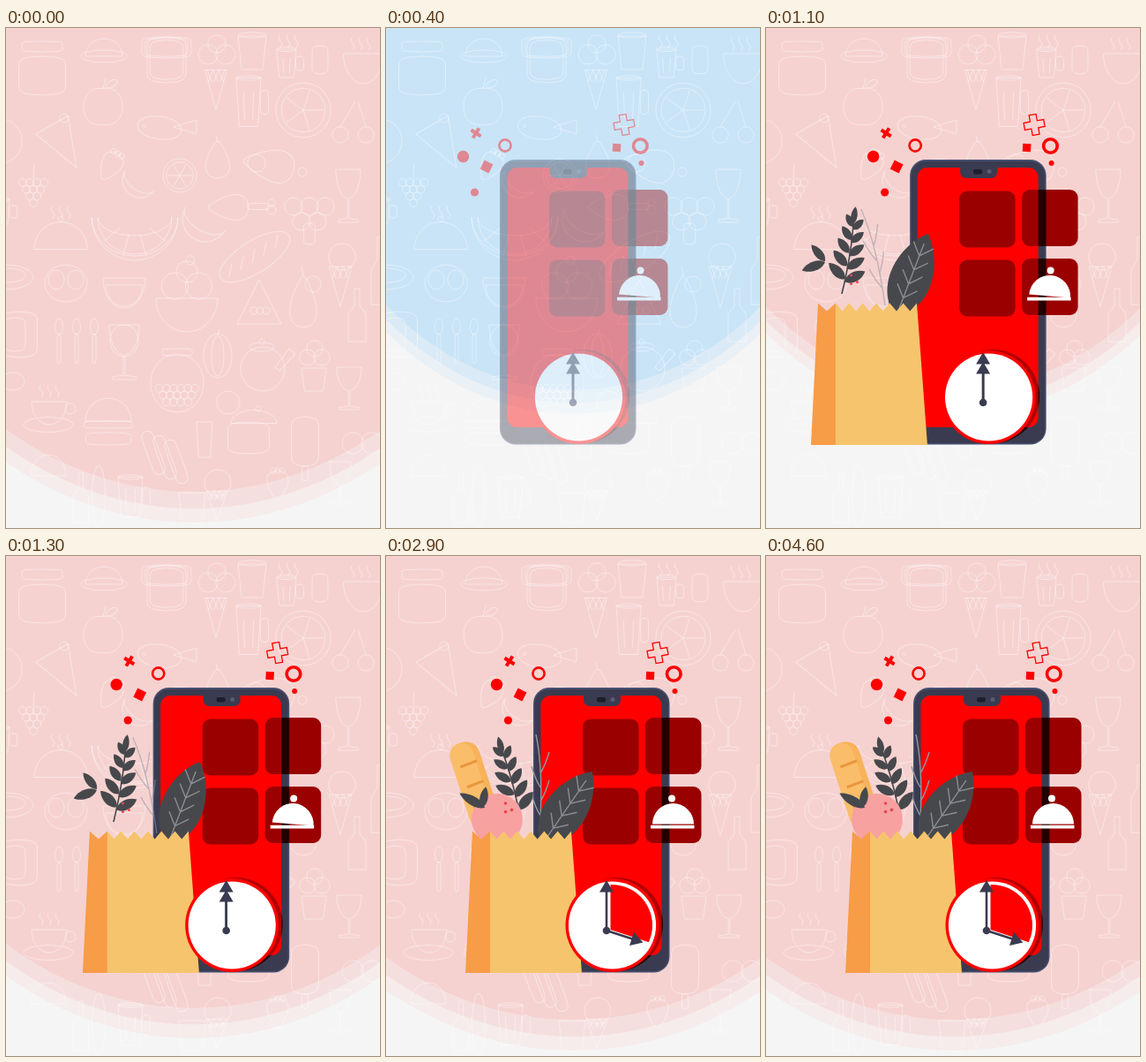
These frames come from a looping animation (424x566 px, 4.7 s). An HTML page with a canvas:

```html
<!DOCTYPE html>
<html lang="en">
<head>
<meta charset="utf-8">
<title>Food order</title>
<style>
html, body { margin: 0; width: 100%; height: 100%; overflow: hidden; background: #f5f5f5; }
canvas { display: block; }
</style>
</head>
<body>
<canvas id="stage" width="424" height="566"></canvas>
<script>
const W = 424, H = 566, LOOP = 4700, STEP = 100, TAU = Math.PI * 2;
const RED = '#ff0000', INK = '#3a3b50', LEAF = '#47484c';
const ctx = document.getElementById('stage').getContext('2d');

function layer() {
  const c = document.createElement('canvas');
  c.width = W; c.height = H;
  return c.getContext('2d');
}
const paper = layer(), s = layer();

const clamp = v => Math.min(1, Math.max(0, v));
const span = (t, a, b) => clamp((t - a) / (b - a));
const mix = (a, b, k) => a + (b - a) * k;
const cubicOut = k => 1 - (1 - k) ** 3;
const smooth = k => k * k * (3 - 2 * k);
const rad = d => d * Math.PI / 180;

function at(g, x, y, deg, draw) {
  g.save();
  g.translate(x, y);
  g.rotate(rad(deg));
  draw();
  g.restore();
}

// ---------- line-art wallpaper ----------
// Half-width of each outline from top (u = 0) to bottom (u = 1).
const ball = u => 2 * Math.sqrt(Math.max(0, u - u * u));
const dome = u => Math.sqrt(u * (2 - u));
const bowl = u => Math.sqrt(1 - u * u);
const slab = u => Math.sqrt(1 - (2 * u - 1) ** 8);
const cup = u => 1 - u / 4;
const cone = u => 1 - u;
const pear = u => ball(u) * (.35 + .75 * u);
const bottle = u => .3 + .7 * smooth(span(u, .3, .5));
const goblet = u => u < .55 ? bowl(u / .55) : u < .93 ? .06 : .8;

function drawWallpaper(g) {
  const put = (shape, w, h, x, y, deg = 0) => at(g, x, y, deg, () => {
    g.beginPath();
    for (const side of [1, -1]) {
      for (let i = 0; i <= 40; i++) {
        const u = side > 0 ? i / 40 : 1 - i / 40;
        g.lineTo(side * w / 2 * shape(u), (u - .5) * h);
      }
    }
    g.closePath();
    g.stroke();
  });
  const spot = (x, y, r) => put(ball, r * 2, r * 2, x, y);
  const cut = (x, y, dx, dy) => {
    g.beginPath();
    g.moveTo(x, y);
    g.lineTo(x + dx, y + dy);
    g.stroke();
  };
  const steam = (x, y) => {
    for (let i = -1; i <= 1; i++) {
      g.beginPath();
      for (let j = 0; j < 15; j++) g.lineTo(x + i * 9 + 2 * Math.sin(j / 2.4), y - j);
      g.stroke();
    }
  };
  // Rows of circles, each row one shorter than the row above.
  const cluster = (x, y, r, top, rows) => {
    for (let j = 0; j < rows; j++)
      for (let i = 0; i < top - j; i++) spot(x + (i - (top - j - 1) / 2) * r * 1.8, y + j * r * 1.7, r);
  };
  const wheel = (x, y, r, n) => {
    spot(x, y, r);
    spot(x, y, r * .8);
    for (let i = 0; i < n; i++) cut(x, y, r * .75 * Math.cos(i * TAU / n), r * .75 * Math.sin(i * TAU / n));
  };
  const crescent = (x, y, r, fat, deg) => at(g, x, y, deg, () => {
    g.beginPath();
    g.arc(0, 0, r, 0, Math.PI);
    g.ellipse(0, 0, r, r * (1 - fat), 0, Math.PI, 0, true);
    g.stroke();
  });
  const mug = (w, h, x, y) => {
    put(cup, w, h, x, y);
    put(ball, w, 5, x, y - h / 2);
    put(slab, 9, h * .5, x + w / 2 + 4, y);
    for (const side of [-1, 1]) cut(x + side * w * .2, y - h * .2, -side, h * .55);
  };
  const waffle = (x, y, w, h) => {
    put(cone, w, h, x, y);
    for (const side of [-1, 1])
      for (let i = 0; i < 3; i++) cut(x + side * w * (.5 - i / 3) * .8, y - h / 2, -side * w * .22, h * .3);
  };
  const cherry = (x, y) => { spot(x, y, 9); cut(x, y - 9, (398 - x) * .9, -29); };
  const berry = (x, y) => { put(u => pear(1 - u), 30, 34, x, y); cluster(x, y - 17, 3, 3, 1); };
  const cutlery = (x, y) => { put(slab, 4, 34, x, y + 9); put(ball, 9, 18, x, y - 16); };

  g.strokeStyle = 'rgba(255,255,255,.42)';
  g.lineWidth = 1;
  g.lineJoin = 'round';

  // jars
  put(slab, 53, 44, 41, 54); put(slab, 46, 12, 41, 21);
  put(ball, 60, 66, 194, 402); put(slab, 34, 8, 194, 367); cluster(194, 408, 4.5, 6, 3);

  // domes and bowls
  put(dome, 42, 20, 111, 22); put(ball, 52, 14, 111, 32);
  put(dome, 60, 31, 62, 235); spot(62, 216, 3); steam(62, 216);
  put(bowl, 45, 34, 405, 46); steam(402, 25);
  put(bowl, 48, 34, 134, 300); put(bowl, 42, 24, 134, 303);
  put(bowl, 70, 38, 205, 325); cluster(205, 292, 15, 2, 1); cluster(205, 276, 12, 1, 1); spot(209, 263, 5);
  put(bowl, 40, 26, 49, 436); put(ball, 56, 17, 48, 449); spot(73, 431, 6); steam(49, 418);
  put(slab, 47, 36, 275, 464); put(dome, 52, 15, 281, 440); spot(286, 431, 3); spot(252, 424, 13);
  put(dome, 52, 26, 116, 432); put(slab, 55, 8, 116, 449); put(slab, 51, 14, 116, 465);
  put(ball, 64, 28, -1, 282); put(ball, 40, 16, 2, 280);

  // glasses and bottles
  put(cup, 32, 38, 279, 28); put(ball, 32, 6, 279, 8);
  mug(22, 32, 318, 40); steam(320, 22);
  mug(28, 55, 275, 84); mug(16, 28, -4, 208); mug(28, 45, 141, 531);
  put(cup, 18, 40, 225, 466); put(cup, 30, 34, 211, 543);
  put(slab, 18, 32, 356, 36);
  put(goblet, 28, 60, 388, 190); put(goblet, 28, 48, 389, 408); put(goblet, 34, 62, 134, 367); put(goblet, 24, 48, 379, 515);
  put(ball, 32, 36, 134, 354);
  put(bottle, 20, 60, 398, 325); put(bottle, 20, 76, 424, 275); put(bottle, 18, 56, 85, 532);
  put(slab, 31, 56, 339, 468); put(slab, 7, 17, 339, 504);

  // fruit and vegetables
  put(u => ball(u) ** .7, 44, 42, 110, 89); cut(110, 69, 3, -12); put(ball, 14, 7, 120, 63, -30);
  cherry(379, 121); cherry(408, 121);
  put(pear, 34, 42, 240, 149); cut(240, 129, -2, -8);
  put(pear, 38, 58, 337, 310); cut(337, 281, -2, -12); spot(348, 290, 9);
  put(ball, 32, 50, 240, 371); put(ball, 14, 46, 240, 371); cut(240, 347, 2, -6);
  at(g, 118, 157, 30, () => berry(0, 0)); berry(308, 518);
  cluster(31, 175, 4.5, 4, 4); cut(31, 171, 1, -18);
  wheel(197, 167, 19, 6); wheel(337, 93, 31, 5);
  cluster(344, 202, 10, 3, 2); put(slab, 13, 24, 344, 233);
  crescent(152, 172, 20, .4, 35); crescent(226, 216, 26, .45, 30);

  // meat and fish
  put(ball, 50, 26, 174, 113, 8); put(cone, 16, 26, 203, 112, 90); spot(157, 111, 1.5);
  put(pear, 46, 58, 298, 155, 280); spot(284, 153, 10); spot(336, 163, 5);
  put(pear, 36, 46, 252, 203, 270); put(slab, 24, 7, 286, 202); cluster(301, 198, 4, 1, 1); spot(301, 206, 5);

  // bread
  for (const k of [1, .86]) {
    put(slab, 44 * k, 52 * k, 182, 36);
    put(slab, 56 * k, 24 * k, 182, 22);
  }
  crescent(146, 214, 42, .5, 0); crescent(146, 214, 49, .1, 0);
  for (let i = 1; i < 5; i++) cut(146 + 21 * Math.cos(i * .63), 214 + 21 * Math.sin(i * .63), 22 * Math.cos(i * .63), 26 * Math.sin(i * .63));
  put(ball, 36, 92, 282, 259, 58);
  for (let i = -2; i <= 2; i++) cut(279 + i * 13, 266 - i * 8, 3, -16);
  put(ball, 48, 42, 68, 289); for (const x of [57, 79]) put(ball, 18, 22, x, 285);
  for (let i = -1; i <= 1; i++) put(slab, 14, 52, 180 + i * 13, 486 + i * 5, -20);

  // sweets
  cluster(239, 30, 11, 2, 1); spot(239, 18, 10); waffle(238, 70, 25, 45);
  spot(381, 259, 15); waffle(379, 293, 26, 46);
  spot(240, 515, 15); waffle(239, 541, 24, 34);
  cluster(350, 373, 9, 2, 1); spot(350, 363, 9); put(cup, 28, 26, 349, 398);
  put(cone, 42, 56, 66, 134, -30); spot(66, 102, 5);
  put(cone, 50, 50, 287, 310, 180); cluster(288, 320, 4, 3, 1);

  // kitchen
  put(ball, 48, 50, -6, 128); put(ball, 50, 50, 291, 386); put(ball, 28, 10, 290, 361); spot(290, 355, 3); put(cup, 9, 26, 316, 376, 40);
  put(slab, 41, 52, 15, 347); put(slab, 24, 38, 10, 347);
  for (let i = 0; i < 3; i++) cutlery(60 + i * 20, 354);
  put(dome, 40, 24, 48, 495); put(ball, 15, 70, 105, 530); put(ball, 26, 20, 8, 400); cluster(404, 470, 12, 2, 1);
}

// ---------- background ----------
const PINK = [245, 210, 208], SKY = [201, 228, 247], DEEP = [165, 205, 240], BASE = [245, 245, 245];
const blend = (a, b, k) => a.map((v, i) => Math.round(mix(v, b[i], k)));

function tint(t) {
  if (t < 300) return blend(PINK, SKY, t / 300);
  if (t < 700) return blend(SKY, DEEP, span(t, 450, 700));
  return blend(DEEP, PINK, span(t, 700, 1050));
}

function backdrop(t) {
  ctx.fillStyle = '#f5f5f5';
  ctx.fillRect(0, 0, W, H);
  const k = t <= 700 ? 1 - (t / 705) ** 2.67 : Math.sin(span(t, 700, 1400) * Math.PI / 2);
  const ring = (rx, ry, c) => {
    ctx.fillStyle = `rgb(${c})`;
    ctx.beginPath();
    ctx.ellipse(213, 0, rx * k, ry * k, 0, 0, TAU);
    ctx.fill();
  };
  const c = tint(t);
  ring(444, 560, blend(BASE, c, .27));
  ring(434, 544, blend(BASE, c, .62));
  ring(425, 525, c);
  ctx.drawImage(paper.canvas, 0, 0);
}

// ---------- foreground ----------
function disc(x, y, r, fill) {
  s.fillStyle = fill;
  s.beginPath();
  s.arc(x, y, r, 0, TAU);
  s.fill();
}
function hoop(x, y, r, w) {
  s.strokeStyle = RED;
  s.lineWidth = w;
  s.beginPath();
  s.arc(x, y, r, 0, TAU);
  s.stroke();
}
function rect(x, y, w, h, r, fill) {
  s.fillStyle = fill;
  s.beginPath();
  s.roundRect(x, y, w, h, r);
  s.fill();
}
function strokePath(color, width, build) {
  s.strokeStyle = color;
  s.lineWidth = width;
  s.beginPath();
  build();
  s.stroke();
}
function blade(x, y, deg, len, wide) {
  at(s, x, y, deg, () => {
    s.fillStyle = LEAF;
    s.beginPath();
    s.moveTo(0, 0);
    s.bezierCurveTo(-wide, -len * .25, -wide * .75, -len * .75, 0, -len);
    s.bezierCurveTo(wide * .75, -len * .75, wide, -len * .25, 0, 0);
    s.fill();
  });
}
function multiply(draw) {
  s.globalCompositeOperation = 'multiply';
  draw();
  s.globalCompositeOperation = 'source-over';
}

function confetti() {
  at(s, 140, 119, 32, () => {
    rect(-6.5, -2, 13, 4, 0, RED);
    rect(-2, -6.5, 4, 13, 0, RED);
  });
  disc(125.5, 145.5, 6.7, RED);
  disc(138.5, 186, 4.6, RED);
  disc(327.5, 153, 3, RED);
  hoop(173, 133, 6.6, 2.6);
  hoop(326.3, 133.5, 7.8, 3.6);
  at(s, 152, 157, 27, () => rect(-5.5, -5.5, 11, 11, 0, RED));
  at(s, 299.5, 135.5, 3, () => rect(-4.6, -4.6, 9.2, 9.2, 0, RED));
  at(s, 308, 109.5, -10, () => strokePath(RED, 1.3, () => {
    const arm = 11.5, half = 4;
    for (let i = 0; i < 4; i++) {
      const c = Math.cos(i * TAU / 4), n = Math.sin(i * TAU / 4);
      for (const [x, y] of [[half, -half], [arm, -half], [arm, half]]) s.lineTo(x * c - y * n, x * n + y * c);
    }
    s.closePath();
  }));
}

function phone() {
  rect(167, 149, 154.5, 322.5, 18, '#454f70');
  rect(168.5, 151, 151.5, 319, 16, INK);
  rect(175.5, 158, 137, 294, 11, RED);
  rect(224, 154, 42, 16, [0, 0, 7, 7], INK);
  rect(239, 160, 10, 5.5, 2, '#1d1e2b');
  disc(257, 162.5, 2.5, '#5a5b6c');
  multiply(() => {
    for (const y of [184, 262]) {
      rect(223, y + .5, 63.5, 64, 9, '#9a0000');
      rect(294, y - 1, 63.5, 64, 9, '#9a0000');
    }
  });
}

function cloche(t) {
  const d = Math.max(0, t - 1850) / 1000;
  rect(300, 304.8, 49.5, 3.6, 0, '#fff');
  at(s, 325.5, 303.5, 5 * Math.exp(-4 * d) * Math.cos(d * TAU / .35), () => {
    s.fillStyle = '#fff';
    s.beginPath();
    s.arc(0, 0, 23.5, Math.PI, TAU);
    s.fill();
    disc(-1.5, -29, 4, '#fff');
  });
}

function hand(deg, len) {
  at(s, 250, 424, deg, () => {
    rect(-1.3, 10 - len, 2.6, len - 10, 0, INK);
    s.beginPath();
    s.moveTo(0, -len);
    s.lineTo(8, 13.5 - len);
    s.lineTo(-8, 13.5 - len);
    s.fill();
  });
}

function clock(t) {
  const k = smooth(span(t, 2050, 2800)), turn = 108 * k;
  multiply(() => disc(261, 417, 53, '#b00000'));
  disc(256.5, 418, 53, RED);
  disc(256.5, 418, 49.6, '#fff');
  if (k > 0) {
    s.save();
    s.beginPath();
    s.arc(256, 418, 46, 0, TAU);
    s.clip();
    s.fillStyle = RED;
    s.beginPath();
    s.moveTo(254.5, 423);
    s.arc(254.5, 423, 99, -Math.PI / 2, rad(turn - 90));
    s.fill();
    s.restore();
  }
  hand(0, 57);
  hand(turn, mix(46, 43.5, k));
  disc(250, 424, 4.3, INK);
}

function sprig(k) {
  at(s, mix(125, 153, k), 301, mix(9, -15, k), () => {
    strokePath(LEAF, 1.6, () => {
      s.moveTo(0, 0);
      s.quadraticCurveTo(4, -50, 0, -84);
    });
    for (let i = 0; i < 5; i++) {
      const y = -14 - i * 15, len = 26 - i * 2.4, wide = 8.5 - i * .6;
      blade(1, y, 54 - i * 4, len, wide);
      blade(1, y - 3, -54 + i * 4, len, wide);
    }
    blade(0, -80, 0, 20, 5.5);
  });
}

function twig(k) {
  at(s, 174, 314, mix(-12, 0, k), () => strokePath(`rgba(150,150,160,${mix(.55, 1, k)})`, 1.4, () => {
    s.moveTo(0, 0);
    s.quadraticCurveTo(5, -70, -4, -112);
    for (let i = 0; i < 4; i++) {
      const y = -20 - i * 16, side = i % 2 ? 1 : -1;
      s.moveTo(1, y);
      s.quadraticCurveTo(1 + side * 6, y - 10, 1 + side * 10, y - 24);
    }
  }));
}

function bigLeaf(k) {
  at(s, mix(186, 176, k), 328, mix(21, 34.5, k), () => {
    blade(0, 0, 0, 102, 36);
    strokePath('#8b8c92', 1.4, () => {
      s.moveTo(0, -4);
      s.lineTo(0, -90);
      for (let y = -24; y > -76; y -= 17) {
        s.moveTo(-12, y - 13);
        s.lineTo(0, y);
        s.lineTo(12, y - 13);
      }
    });
  });
}

function loaf(k) {
  if (k <= 0) return;
  at(s, 100 + 14 * (1 - k), 258 + 110 * (1 - k), -18, () => {
    rect(-17, -49, 34, 100, 16, '#f7b25a');
    rect(-17, -49, 27, 100, 16, '#fabd69');
    strokePath('#e9973f', 3, () => {
      for (let y = -24; y < 30; y += 24) {
        s.moveTo(-9, y + 1);
        s.lineTo(11, y);
      }
    });
  });
}

function sack() {
  const teeth = (x, w, n, left, right, fill) => {
    s.fillStyle = fill;
    s.beginPath();
    for (let i = 0; i <= n * 2; i++) s.lineTo(x + w * i / n / 2, i % 2 ? 320.5 : 311.5);
    s.lineTo(right, 472);
    s.lineTo(left, 472);
    s.fill();
  };
  teeth(98, 20, 1, 90, 118, '#f79c47');
  teeth(118, 92, 6, 118, 222, '#f6c46c');
}

function bag(t) {
  if (t < 800) return;
  const k = cubicOut(span(t, 1300, 1750));
  at(s, -250 * (1 - cubicOut(span(t, 800, 1450))), 0, 0, () => {
    loaf(k);
    twig(k);
    sprig(k);
    bigLeaf(k);
    disc(126, mix(325, 298, k), 29 * k, '#f7a1a1');
    blade(mix(106, 112, k), mix(265, 285, k), mix(-110, -60, k), mix(28, 33, k), 8);
    blade(mix(106, 109, k), mix(264, 285, k), mix(-40, 10, k), 24, 7);
    for (let i = 0; i < 3; i++) disc(135.5 + 7 * (i % 2), 280 + i * (10 - i * 2.6), mix(1.5, 1.8, k), '#e9454c');
    sack();
  });
}

function frame() {
  const t = Math.floor((performance.now() + 4) % LOOP / STEP) * STEP;
  backdrop(t);
  const dx = -38 * (1 - cubicOut(span(t, 700, 1450)));
  const slide = draw => at(s, dx, 0, 0, () => draw(t));
  s.clearRect(0, 0, W, H);
  [confetti, phone, cloche].forEach(slide);
  bag(t);
  slide(clock);
  ctx.globalAlpha = span(t, 200, 700);
  ctx.drawImage(s.canvas, 0, 0);
  ctx.globalAlpha = 1;
  requestAnimationFrame(frame);
}

drawWallpaper(paper);
frame();
</script>
</body>
</html>
```
